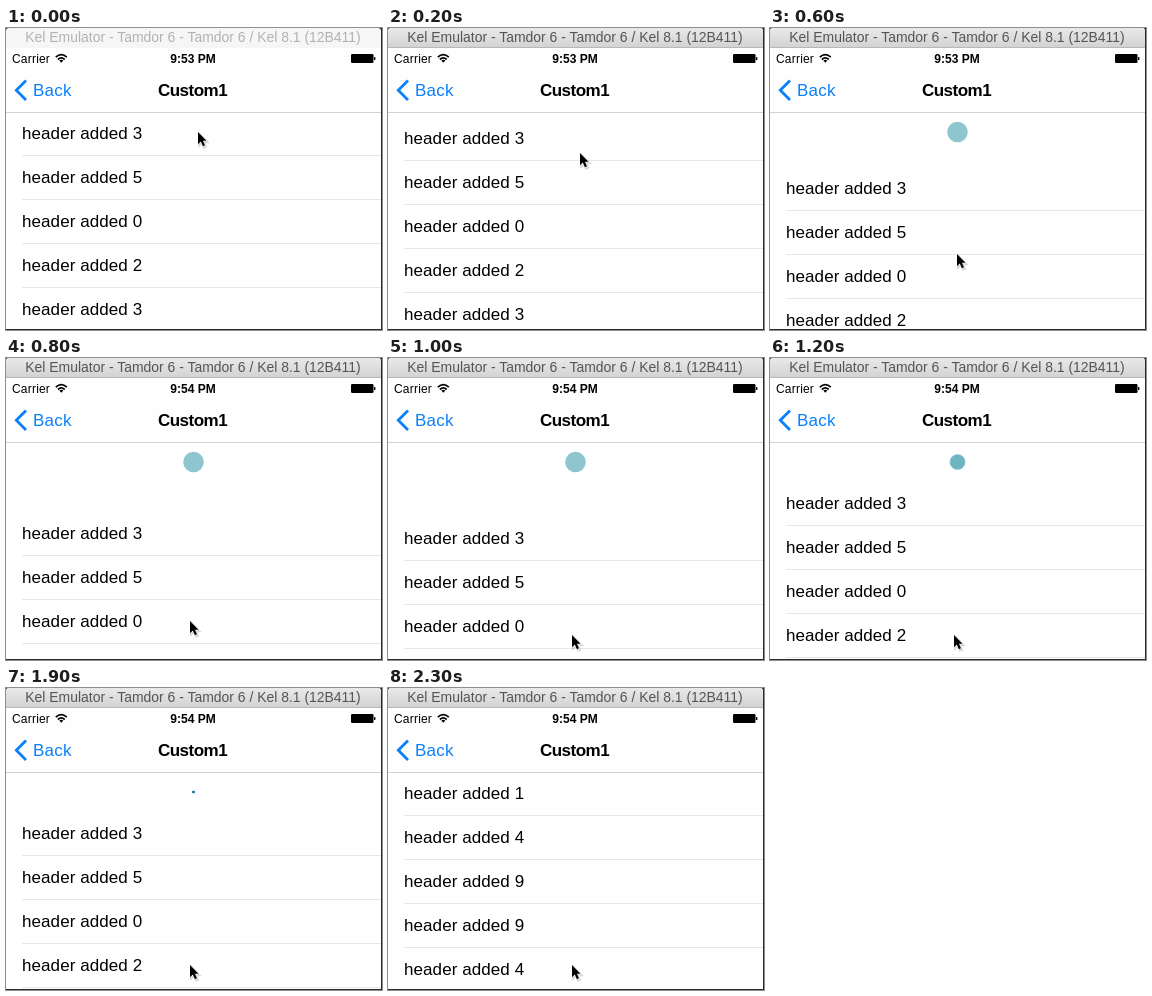
An HTML page that plays this animation: 376 px wide and 302 px high, repeating every 2.4 s.

```html
<!DOCTYPE html>
<html lang="en">
<head>
<meta charset="utf-8">
<title>Pull to refresh</title>
<style>
  html, body { margin: 0; width: 100%; height: 100%; overflow: hidden; background: #2a2a2a; }
  svg { display: block; width: 376px; height: 302px; }
  text { font: 17px "Liberation Sans", Arial, sans-serif; }
  .window-title { font-size: 13.95px; text-anchor: middle; }
  .status { font-size: 12px; }
  .bold { font-weight: bold; text-anchor: middle; }

  /* Everything advances in 100 ms ticks: one tick is 1/24 of the loop. */
  .anim { animation: 2400ms step-end infinite; }
  #list { animation-name: pull; }
  #pointer { animation-name: drag; }
  #dot { animation-name: pulse; transform-origin: 187.5px 104px; }
  .focused { animation-name: focus; }
  .early { animation-name: early; }
  .late { animation-name: late; }
  .before { animation-name: before; }
  .after { animation-name: after; }

  @keyframes pull {
    0% { transform: translateY(0); }
    4.16% { transform: translateY(1px); }
    8.33% { transform: translateY(5px); }
    12.49% { transform: translateY(16px); }
    16.66% { transform: translateY(30px); }
    20.83% { transform: translateY(43px); }
    24.99% { transform: translateY(55px); }
    29.16% { transform: translateY(64px); }
    33.32% { transform: translateY(70px); }
    37.49% { transform: translateY(73px); }
    41.66% { transform: translateY(75px); }
    45.83% { transform: translateY(51px); }
    49.99%, 79.16% { transform: translateY(40px); }
    83.33% { transform: translateY(34px); }
    87.49% { transform: translateY(18px); }
    91.66% { transform: translateY(5px); }
    95.83%, 100% { transform: translateY(0); }
  }
  @keyframes drag {
    0% { transform: translate(192px, 104px); }
    4.16% { transform: translate(192px, 112px); }
    8.33% { transform: translate(192px, 125px); }
    12.49% { transform: translate(192px, 147px); }
    16.66% { transform: translate(192px, 172px); }
    20.83% { transform: translate(190px, 199px); }
    24.99% { transform: translate(187px, 226px); }
    29.16% { transform: translate(185px, 248px); }
    33.32% { transform: translate(184px, 263px); }
    37.49% { transform: translate(184px, 272px); }
    41.66%, 100% { transform: translate(184px, 277px); }
  }
  /* The dot fades as it grows. */
  @keyframes pulse {
    0% { transform: scale(0); opacity: 1; }
    8.33% { transform: scale(.12); opacity: .93; }
    12.49% { transform: scale(.4); opacity: .77; }
    16.66% { transform: scale(.73); opacity: .59; }
    20.83%, 41.66% { transform: scale(1); opacity: .45; }
    45.83% { transform: scale(.9); opacity: .5; }
    49.99% { transform: scale(.75); opacity: .58; }
    54.16% { transform: scale(1); opacity: .45; }
    58.33% { transform: scale(.97); opacity: .46; }
    62.49% { transform: scale(.87); opacity: .51; }
    66.66% { transform: scale(.7); opacity: .6; }
    70.83% { transform: scale(.5); opacity: .72; }
    74.99% { transform: scale(.3); opacity: .83; }
    79.16% { transform: scale(.15); opacity: .92; }
    83.33%, 100% { transform: scale(0); opacity: 1; }
  }
  @keyframes focus { 0% { opacity: 0; } 4.16%, 100% { opacity: 1; } }
  @keyframes early { 0% { opacity: 1; } 29.16%, 100% { opacity: 0; } }
  @keyframes late { 0% { opacity: 0; } 29.16%, 100% { opacity: 1; } }
  @keyframes before { 0% { opacity: 1; } 83.33%, 100% { opacity: 0; } }
  @keyframes after { 0% { opacity: 0; } 83.33%, 100% { opacity: 1; } }
</style>
</head>
<body>
<svg viewBox="0 0 376 302">
  <defs>
    <linearGradient id="chrome" x2="0" y2="1">
      <stop stop-color="#e9e9e9"/>
      <stop offset="1" stop-color="#d2d2d2"/>
    </linearGradient>
    <path id="bar" d="M0 20V3Q0 0 3 0H372Q375 0 375 3V20Z"/>
    <path id="arrow" d="M0 0V12.2L2.8 9.6L4.9 14.2L7 13.3L5 8.8H8.6Z"/>
    <clipPath id="screen"><rect width="375" height="301"/></clipPath>
  </defs>

  <g clip-path="url(#screen)">
    <rect y="20" width="375" height="282" fill="#fff"/>
    <circle id="dot" class="anim" cx="187.5" cy="104" r="10.3" fill="#057e94"/>

    <g id="list" class="anim">
      <rect y="85" width="375" height="220" fill="#fff"/>
      <g id="lines" fill="#e6e6e6"></g>
      <g id="oldRows" class="anim before"></g>
      <g id="newRows" class="anim after"></g>
    </g>

    <rect y="20" width="375" height="64" fill="#fefefe"/>
    <rect y="84" width="375" height="1" fill="#d2d2d2"/>

    <use href="#bar" fill="#f6f6f6"/>
    <text class="window-title" x="187" y="14" fill="#b2b2b2">Kel Emulator - Tamdor 6 - Tamdor 6 / Kel 8.1 (12B411)</text>
    <g class="anim focused">
      <use href="#bar" fill="url(#chrome)"/>
      <rect y="19" width="375" height="1" fill="#b8b8b8"/>
      <text class="window-title" x="187" y="14" fill="#555">Kel Emulator - Tamdor 6 - Tamdor 6 / Kel 8.1 (12B411)</text>
    </g>

    <text class="status" x="6" y="35" letter-spacing=".2">Carrier</text>
    <g fill="none" stroke="#000" stroke-width="1.7">
      <path d="M49.8 29.2Q55.3 24.2 60.8 29.2M51.9 31.5Q55.3 28.4 58.7 31.5"/>
      <path d="M53.3 32.6Q55.3 31 57.3 32.6L55.3 34.8Z" fill="#000" stroke="none"/>
    </g>
    <text class="status bold anim early" x="187" y="35">9:53 PM</text>
    <text class="status bold anim late" x="187" y="35">9:54 PM</text>
    <rect x="345" y="26" width="22.5" height="9" rx="1.2"/>
    <rect x="368" y="29" width="1.4" height="3" rx=".6"/>

    <path d="M20 52.5L10.3 62.3L20 72" fill="none" stroke="#0a80fb" stroke-width="2.8"/>
    <text x="27" y="68" fill="#0a80fb" letter-spacing=".25">Back</text>
    <text class="bold" x="186.5" y="68" letter-spacing="-.5">Custom1</text>

    <g id="pointer" class="anim">
      <use href="#arrow" x="1" y="1.5" fill="none" stroke="#000" stroke-opacity=".15" stroke-width="2"/>
      <use href="#arrow" stroke="#fff" paint-order="stroke"/>
    </g>
  </g>
</svg>
<script>
  const rowHeight = 44;

  function add(parent, tag, attrs, text = "") {
    const el = document.createElementNS("http://www.w3.org/2000/svg", tag);
    for (const key in attrs) el.setAttribute(key, attrs[key]);
    el.textContent = text;
    document.getElementById(parent).append(el);
  }

  function fill(group, numbers) {
    numbers.forEach((n, i) =>
      add(group, "text", { x: 16, y: 111.4 + i * rowHeight, "letter-spacing": .08 }, `header added ${n}`));
  }

  for (let i = 0; i < 5; i++) {
    add("lines", "rect", { x: 16, y: 127 + i * rowHeight, width: 359, height: 1 });
  }
  fill("oldRows", [3, 5, 0, 2, 3]);
  fill("newRows", [1, 4, 9, 9, 4]);
</script>
</body>
</html>
```
